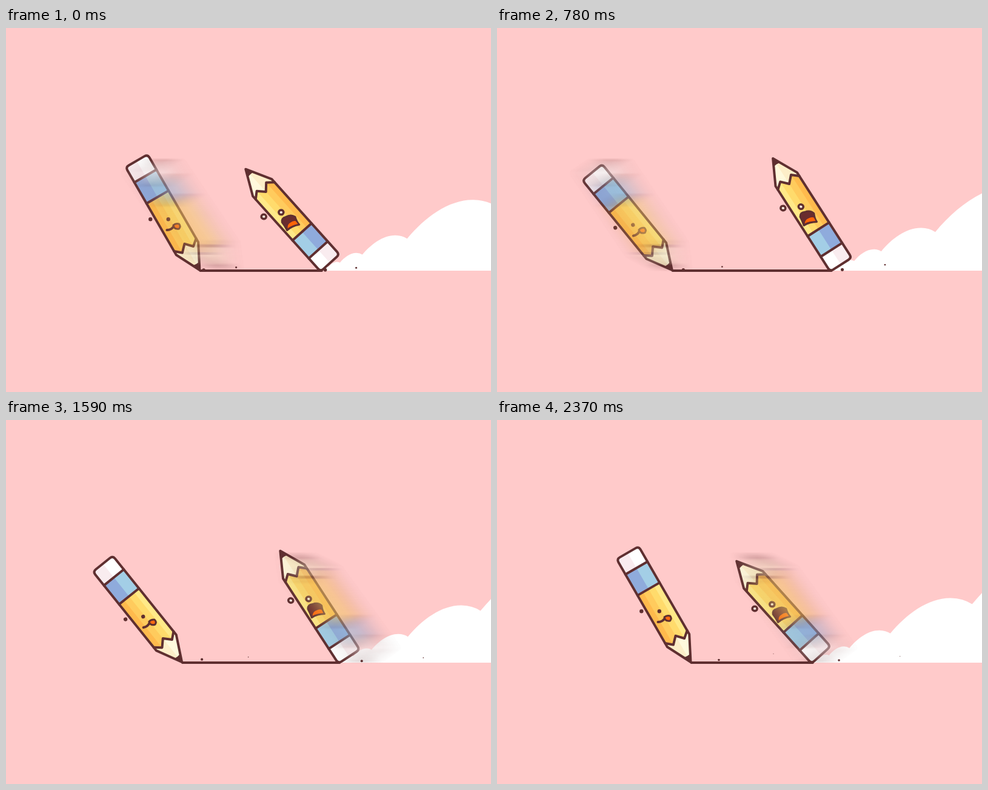
These frames come from a looping animation (800 px wide and 600 px high, 2400 ms). An HTML page with a canvas:

```html
<!DOCTYPE html>
<html lang="en">
<head>
<meta charset="utf-8">
<title>Pencils</title>
<style>
  html, body { margin: 0; width: 100%; height: 100%; overflow: hidden; background: #ffcaca; }
  canvas { display: block; width: 800px; height: 600px; }
</style>
</head>
<body>
<canvas id="stage" width="800" height="600"></canvas>
<script>
let ctx = document.getElementById('stage').getContext('2d');
const STEP = 30, STEPS = 80, PUFF = 5;
const INK = '#5f2f30', GROUND = 400;
const HALF = 21, LEN = 208, FERRULE = 139, ERASER = 179;
const rad = deg => deg * Math.PI / 180;
const lerp = (a, b, p) => a + (b - a) * p;
const random = seed => Math.abs(Math.sin(seed * 127.1 + 3.7) * 43758.5) % 1;

// cubic-bezier(.42, 0, .58, 1)
function ease(x) {
  let lo = 0, hi = 1;
  for (let i = 0; i < 24; i++) {
    const s = (lo + hi) / 2, r = 1 - s;
    if (3 * r * r * s * 0.42 + 3 * r * s * s * 0.58 + s * s * s < x) lo = s; else hi = s;
  }
  return lo * lo * (3 - 2 * lo);
}

// the pencils glide apart and back; p = 0 close, p = 1 far
function pose(n) {
  const u = ((n + 1) % STEPS) / (STEPS / 2);
  const p = u < 1 ? ease(u) : 1 - ease(u - 1);
  const leftAngle = lerp(-30, -41.8, p), rightAngle = lerp(-42, -30, p);
  const a = rad(rightAngle), c = Math.cos(a), s = Math.sin(a);
  const cornerX = lerp(518.8, 558.3, p);
  return {
    p, leftAngle, rightAngle, cornerX,
    left: [lerp(319.5, 280, p), 399],
    right: [cornerX + HALF * c + LEN * s, 401.4 + HALF * s - LEN * c]
  };
}

function at([x, y], deg, draw) {
  ctx.save();
  ctx.translate(x, y);
  ctx.rotate(rad(deg));
  draw();
  ctx.restore();
}

function paint(d, fill, stroke, width = 4) {
  const path = new Path2D(d);
  if (fill) { ctx.fillStyle = fill; ctx.fill(path); }
  if (stroke) { ctx.strokeStyle = stroke; ctx.lineWidth = width; ctx.stroke(path); }
}

function dot(x, y, r) {
  ctx.fillStyle = INK;
  ctx.beginPath();
  ctx.arc(x, y, r, 0, 7);
  ctx.fill();
}

function stripes(y0, y1, ...colors) {
  const w = 2 * HALF / colors.length;
  colors.forEach((color, i) => {
    ctx.fillStyle = color;
    ctx.fillRect(i * w - HALF, y0, 2 * HALF - i * w, y1 - y0);
  });
}

const OUTLINE = `M0 0L${HALF} 41V${LEN - 6}q0 6 -6 6H${6 - HALF}q-6 0 -6 -6V41Z`;
const ZIGZAG = `M${-HALF} 48L-10.5 39L0 50L10.5 39L${HALF} 48`;

// tip at the origin, body along +y
function pencil() {
  ctx.save();
  ctx.clip(new Path2D(OUTLINE));
  stripes(36, FERRULE, '#ffe988', '#ffdb6c', '#ffcb5d', '#ffba4d');
  stripes(FERRULE, ERASER, '#a3cee6', '#8fabdc');
  stripes(ERASER, LEN, '#ffffff', '#f9ecef');
  ctx.save();
  ctx.clip(new Path2D(ZIGZAG + `V0H${-HALF}Z`));
  stripes(0, 52, '#fff9dc', '#fdeec8');
  ctx.restore();
  paint('M0 0L8 13Q0 10 -8 13Z', INK);
  ctx.restore();
  paint(ZIGZAG, null, INK);
  paint(`M${-HALF} ${FERRULE}H${HALF}M${-HALF} ${ERASER}H${HALF}`, null, INK);
  paint(OUTLINE, null, INK);
}

// faces are placed as they stand when upright, relative to the tip
function happyFace() {
  ctx.translate(-319.5, -399);
  dot(238.3, 315.2, 3.2);
  dot(267.8, 315.2, 3.2);
  paint('M265.5 333Q273 333 277 326.5', null, INK);
  paint('M276 325Q280 321.5 285.5 323Q289 327 285.5 331Q280 332 277.5 329Z', '#ff6a12', INK, 3);
}

function ring(x, y) {
  ctx.beginPath();
  ctx.ellipse(x, y, 4, 3.7, 0.3, 0, 7);
  ctx.fillStyle = '#fff3e6';
  ctx.fill();
  ctx.strokeStyle = INK;
  ctx.lineWidth = 3.6;
  ctx.stroke();
}

function scaredFace() {
  ctx.translate(-472.5, -210.8);
  ring(485.5, 293.5);
  ring(515, 292.5);
  paint('M513 309Q513 302 521 301.5Q530 298.5 536 304.5Q536.5 313 540 318.5Q528 318 518.5 323.5Q516 315 513 309Z', '#6a2c2e', INK, 3);
  paint('M520 320.5Q521 314 526 312.5Q532 309.5 535.5 311.5L538 317Q527 317 520 320.5Z', '#ff6508');
}

// bumps double in size outwards; the whole row doubles in every cycle
function cloud(n, cornerX) {
  const x0 = cornerX - 5, size = 26.4 + 5.45 * (n % PUFF);
  ctx.fillStyle = '#fff';
  ctx.beginPath();
  ctx.moveTo(x0, GROUND);
  for (let k = -4; k < 5; k++) {
    const h = size * 2 ** k;
    const pt = (x, y) => [x0 + x * h, GROUND - y * h];
    ctx.lineTo(...pt(2.8, 1));
    ctx.bezierCurveTo(...pt(3.35, 1.66), ...pt(4.1, 2.22), ...pt(4.87, 2.21));
    ctx.quadraticCurveTo(...pt(5.3, 2.2), ...pt(5.6, 2));
  }
  ctx.lineTo(x0 + 9000, GROUND);
  ctx.fill();
}

function layer(draw) {
  const main = ctx, canvas = document.createElement('canvas');
  canvas.width = 420;
  canvas.height = 260;
  ctx = canvas.getContext('2d');
  ctx.lineJoin = ctx.lineCap = 'round';
  draw();
  ctx = main;
  return canvas;
}

// a pencil smeared to the left by averaging shifted copies
function smear(tip, deg) {
  let image = layer(() => at(tip, deg, pencil));
  for (const width of [24, 16]) {
    for (let d = width; d > 1; d /= 2) {
      const last = image;
      image = layer(() => {
        ctx.globalCompositeOperation = 'lighter';
        ctx.globalAlpha = 0.5;
        ctx.drawImage(last, 0, 0);
        ctx.drawImage(last, -d, 0);
      });
    }
  }
  return (x, y) => {
    ctx.globalAlpha = 0.6;
    ctx.drawImage(image, x - tip[0], y - tip[1]);
    ctx.globalAlpha = 1;
  };
}
const leftSmear = smear([290, 240], 146);
const rightSmear = smear([100, 20], -36);

// crumbs fly off to the right, rising and shrinking
function crumbs(n, x, side) {
  for (let i = 0; i < STEPS / PUFF; i++) {
    const seed = i * 2 + side + 1;
    const age = (n - i * PUFF + 0.8 + STEPS) % STEPS;
    if (age > 10) continue;
    const speed = 6 + 4 * random(seed) + 0.7 * age;
    dot(x + speed * age, GROUND - age * (0.7 + random(seed + 50)), 3 - age / 4);
  }
}

function render(n) {
  const q = pose(n);
  ctx.lineJoin = ctx.lineCap = 'round';
  ctx.fillStyle = '#ffcaca';
  ctx.fillRect(0, 0, 800, 600);
  cloud(n, q.cornerX);
  paint(`M${q.left[0] + 1} ${GROUND}H${q.cornerX + 2}`, null, INK);
  at(q.left, q.leftAngle + 180, pencil);
  at(q.left, q.leftAngle + 30, happyFace);
  at(q.right, q.rightAngle, pencil);
  at(q.right, q.rightAngle + 30, scaredFace);
  if (n % 2) rightSmear(q.right[0] + 64, 220);
  else leftSmear(q.left[0] + lerp(76, 26, q.p), 399);
  crumbs(n, q.left[0], 0);
  crumbs(n, q.cornerX, 1);
}

const start = performance.now();
let shown = -1;
function tick() {
  const n = Math.floor((performance.now() - start) / STEP) % STEPS;
  if (n !== shown) render(shown = n);
  requestAnimationFrame(tick);
}
tick();
</script>
</body>
</html>
```
